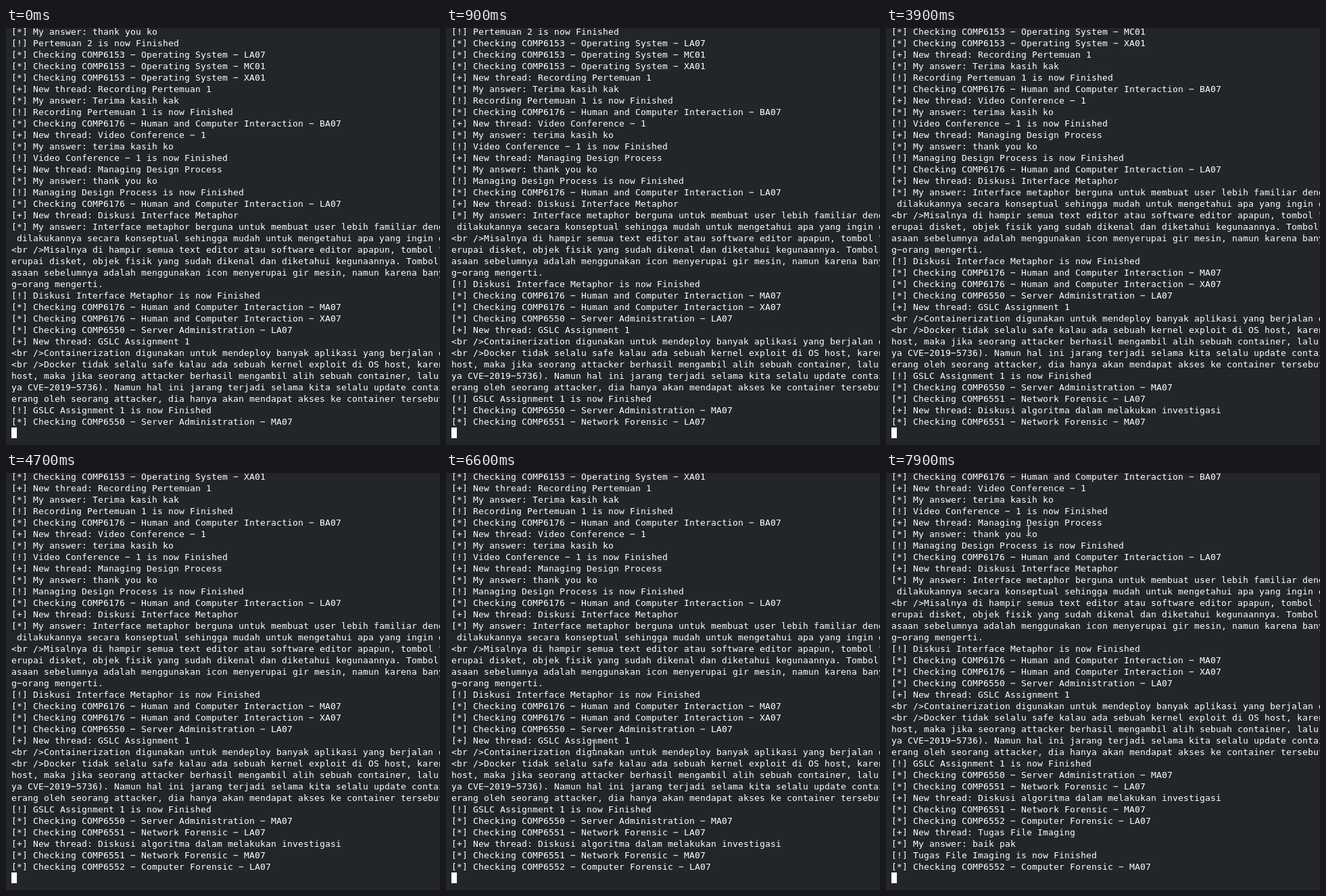
Write an HTML page that moves like this. It is 642x618 px and loops after 8000 ms.

```html
<!DOCTYPE html>
<html lang="id">
<head>
<meta charset="utf-8">
<title>Terminal</title>
<style>
  html, body { margin: 0; width: 100%; height: 100%; overflow: hidden; background: #22262b; }
  .output { position: absolute; left: 0; top: 0; width: 642px; height: 592px; overflow: hidden; }
  pre {
    position: absolute; left: 8px; top: -3px; margin: 0;
    font: 13px/17px "DejaVu Sans Mono", monospace;
    letter-spacing: calc(8px - 1ch); /* whole-pixel terminal cells */
    color: #fff;
    animation: scroll 8s step-end infinite;
  }
  .caret { position: absolute; left: 8px; top: 592px; width: 8px; height: 16px; background: #fff; }
  .pointer {
    position: absolute; left: -5px; top: -9px; width: 10px; height: 18px;
    animation: pointer 8s step-end infinite;
  }

  /* one printed row = 17px */
  @keyframes scroll {
    0% { transform: translateY(0); }
    10% { transform: translateY(-17px); }
    47.5% { transform: translateY(-51px); }
    58.75% { transform: translateY(-68px); }
    88.75%, 100% { transform: translateY(-136px); }
  }

  /* the mouse is sampled every 100ms (1.25%) */
  @keyframes pointer {
    0% { transform: translate(-40px, 0); }
    43.75% { transform: translate(510px, 504px); }
    45% { transform: translate(-40px, 0); }
    65% { transform: translate(386px, 485px); }
    66.25% { transform: translate(350px, 474px); }
    67.5% { transform: translate(308px, 457px); }
    68.75% { transform: translate(265px, 438px); }
    70% { transform: translate(225px, 421px); }
    71.25% { transform: translate(192px, 410px); }
    72.5% { transform: translate(170px, 409px); }
    73.75% { transform: translate(157px, 414px); }
    75% { transform: translate(152px, 420px); }
    77.5% { transform: translate(126px, 425px); }
    78.75% { transform: translate(97px, 424px); }
    80% { transform: translate(118px, 420px); }
    81.25% { transform: translate(165px, 413px); }
    82.5% { transform: translate(219px, 404px); }
    83.75% { transform: translate(280px, 366px); }
    85% { transform: translate(306px, 300px); }
    86.25% { transform: translate(275px, 226px); }
    87.5% { transform: translate(248px, 188px); }
    97.5% { transform: translate(211px, 82px); }
    98.75%, 100% { transform: translate(211px, 85px); }
  }
</style>
</head>
<body>
<div class="output"><pre>[*] My answer: thank you ko
[!] Pertemuan 2 is now Finished
[*] Checking COMP6153 − Operating System − LA07
[*] Checking COMP6153 − Operating System − MC01
[*] Checking COMP6153 − Operating System − XA01
[+] New thread: Recording Pertemuan 1
[*] My answer: Terima kasih kak
[!] Recording Pertemuan 1 is now Finished
[*] Checking COMP6176 − Human and Computer Interaction − BA07
[+] New thread: Video Conference − 1
[*] My answer: terima kasih ko
[!] Video Conference − 1 is now Finished
[+] New thread: Managing Design Process
[*] My answer: thank you ko
[!] Managing Design Process is now Finished
[*] Checking COMP6176 − Human and Computer Interaction − LA07
[+] New thread: Diskusi Interface Metaphor
[*] My answer: Interface metaphor berguna untuk membuat user lebih familiar deng
 dilakukannya secara konseptual sehingga mudah untuk mengetahui apa yang ingin d
&lt;br />Misalnya di hampir semua text editor atau software editor apapun, tombol “
erupai disket, objek fisik yang sudah dikenal dan diketahui kegunaannya. Tombol
asaan sebelumnya adalah menggunakan icon menyerupai gir mesin, namun karena bany
g−orang mengerti.
[!] Diskusi Interface Metaphor is now Finished
[*] Checking COMP6176 − Human and Computer Interaction − MA07
[*] Checking COMP6176 − Human and Computer Interaction − XA07
[*] Checking COMP6550 − Server Administration − LA07
[+] New thread: GSLC Assignment 1
&lt;br />Containerization digunakan untuk mendeploy banyak aplikasi yang berjalan d
&lt;br />Docker tidak selalu safe kalau ada sebuah kernel exploit di OS host, karen
host, maka jika seorang attacker berhasil mengambil alih sebuah container, lalu
ya CVE−2019−5736). Namun hal ini jarang terjadi selama kita selalu update contai
erang oleh seorang attacker, dia hanya akan mendapat akses ke container tersebut
[!] GSLC Assignment 1 is now Finished
[*] Checking COMP6550 − Server Administration − MA07
[*] Checking COMP6551 − Network Forensic − LA07
[+] New thread: Diskusi algoritma dalam melakukan investigasi
[*] Checking COMP6551 − Network Forensic − MA07
[*] Checking COMP6552 − Computer Forensic − LA07
[+] New thread: Tugas File Imaging
[*] My answer: baik pak
[!] Tugas File Imaging is now Finished
[*] Checking COMP6552 − Computer Forensic − MA07</pre></div>
<div class="caret"></div>
<svg class="pointer" viewBox="0 0 10 18" fill="none">
  <defs><path id="beam" d="M1.5 1.5H4L5 2.5L6 1.5H8.5M5 2.5V15.5M1.5 16.5H4L5 15.5L6 16.5H8.5"/></defs>
  <use href="#beam" stroke="#15181c" stroke-width="3"/>
  <use href="#beam" stroke="#fff" stroke-width="1.2"/>
</svg>
</body>
</html>
```
